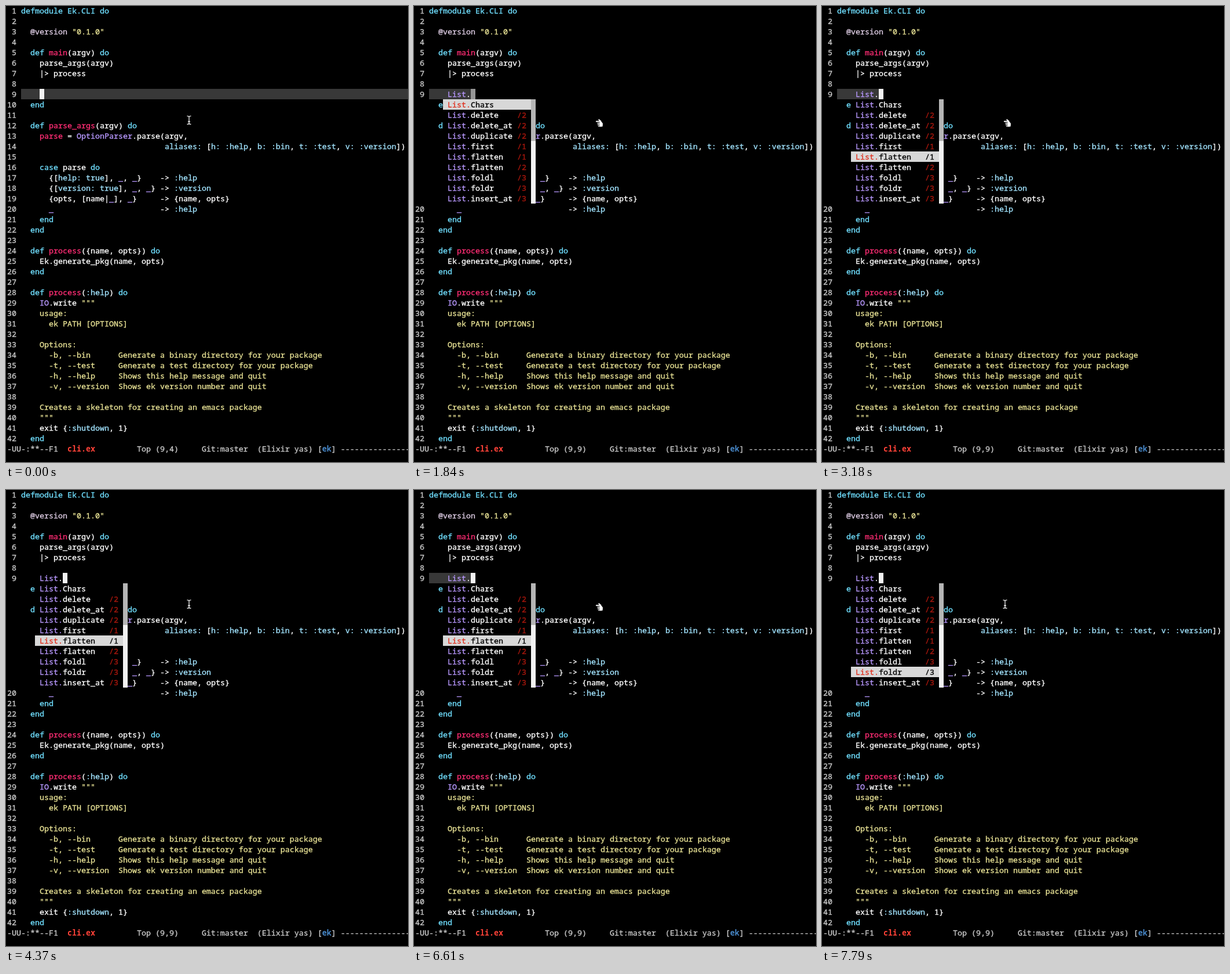
Recreate the animation shown at these times as an HTML page. Size 694 px wide and 787 px high, loop 8000 ms.

```html
<!DOCTYPE html>
<html lang="en">
<head>
<meta charset="utf-8">
<title>Editor completion</title>
<style>
html, body { margin: 0; width: 100%; height: 100%; overflow: hidden; background: #000; }
#stage {
  position: absolute; left: 0; top: 0; width: 694px; height: 787px; overflow: hidden; background: #000;
  color: #fff; font: 500 13.3333px/18px "Noto Sans Mono", monospace; font-variant-ligatures: none;
  -webkit-text-stroke: .35px currentColor;
}
#stage div, #stage svg { position: absolute; }
.line { white-space: pre; height: 18px; }
.line span { -webkit-text-stroke-color: currentColor; }
b { font-weight: 700; -webkit-text-stroke: 0; }
.key { color: #70dfff; }
.func { color: #ff2d74; }
.atom { color: #a2e4ff; }
.mod { color: #b898ff; }
.str { color: #e8e295; }
.attr { color: #dccbe2; }
.num, .mode { color: #cacaca; }
.file { color: #ff4238; }
.proj { color: #4787c8; }
.gold { color: #d2b400; }
.teal { color: #00a9ac; }
.hover { background: #000; color: #f4f4f4; }
.arity { color: #a8170d; }
#hl { left: 26px; top: 143px; height: 18px; background: #383838; }
#cursor { top: 143px; width: 8px; height: 18px; }
#popup { left: 50px; top: 161px; width: 160px; height: 180px; background: #000; }
.item { left: 0; width: 144px; padding-left: 8px; }
.item.on { background: #d8d8d8; color: #000; }
.item.on .mod { color: #e0301f; }
.item.on .arity { color: #000; }
#track { left: 152px; top: 0; width: 8px; height: 180px; background: #f2f2f2; }
#thumb { left: 152px; top: 0; width: 8px; height: 72px; background: #b5b5b5; }
#help { left: 0; top: 305px; width: 694px; height: 482px; background: #000; }
.inactive { background: #383838; width: 692px; overflow: hidden; }
</style>
</head>
<body>
<div id="stage">
  <div id="hl"></div>
  <div id="code"></div>
  <div id="cursor"></div>
  <div id="popup"></div>
  <div id="help"></div>
  <svg id="ibeam" width="694" height="787" fill="none" stroke="#f0f0f0" stroke-width="1.3">
    <path d="M312.5 189.8Q315.5 189.8 316 191.5Q316.5 189.8 319.5 189.8M316 191V203M312.5 204.2Q315.5 204.2 316 202.5Q316.5 204.2 319.5 204.2M314 199.5H318"/>
  </svg>
  <svg id="hand" width="694" height="787" fill="#fff" stroke="#fff" stroke-linecap="round">
    <path d="M320.5 198.5L324 200L326 203L325.5 208L322 208.5L320.5 207Z" stroke="none"/>
    <path d="M314.8 199.3H322M319.2 196.2L322.5 199" stroke-width="1.9"/>
    <path d="M317.3 202.4H322M317.6 205H322M318.8 207.5H322" stroke-width="1.7"/>
  </svg>
</div>
<script>
const source = `defmodule Ek.CLI do

  @version "0.1.0"

  def main(argv) do
    parse_args(argv)
    |> process


  end

  def parse_args(argv) do
    parse = OptionParser.parse(argv,
                               aliases: [h: :help, b: :bin, t: :test, v: :version])

    case parse do
      {[help: true], _, _}    -> :help
      {[version: true], _, _} -> :version
      {opts, [name|_], _}     -> {name, opts}
      _                       -> :help
    end
  end

  def process({name, opts}) do
    Ek.generate_pkg(name, opts)
  end

  def process(:help) do
    IO.write """
    usage:
      ek PATH [OPTIONS]

    Options:
      -b, --bin      Generate a binary directory for your package
      -t, --test     Generate a test directory for your package
      -h, --help     Shows this help message and quit
      -v, --version  Shows ek version number and quit

    Creates a skeleton for creating an emacs package
    """
    exit {:shutdown, 1}
  end`.split("\n");

const items = ["Chars", "delete/2", "delete_at/2", "duplicate/2", "first/1", "flatten/1",
  "flatten/2", "foldl/3", "foldr/3", "insert_at/3"];

const $ = id => document.getElementById(id);
const escapeHtml = s => s.replace(/&/g, "&amp;").replace(/</g, "&lt;").replace(/>/g, "&gt;");
const span = (cls, s) => `<span class="${cls}">${escapeHtml(s)}</span>`;
const bold = (cls, s) => `<b class="${cls}">${escapeHtml(s)}</b>`;

const rules = [
  ["str", /"+[^"]*"+/],
  ["func", /(?<=def )\w+|\bparse(?= =)/],
  ["key", /\b(?:defmodule|def|do|end|case)\b|Ek\.CLI/],
  ["attr", /@\w+/],
  ["atom", /:\w+|\w+:|\btrue\b/],
  ["mod", /\b(?:OptionParser|IO|List|_)\b/],
];
const tokens = new RegExp(rules.map(([cls, re]) => `(?<${cls}>${re.source})`).join("|"), "g");

function highlight(text) {
  let html = "", end = 0;
  for (const m of text.matchAll(tokens)) {
    const cls = Object.keys(m.groups).find(k => m.groups[k] !== undefined);
    html += escapeHtml(text.slice(end, m.index)) + span(cls, m[0]);
    end = m.index + m[0].length;
  }
  return html + escapeHtml(text.slice(end));
}

function addLine(parent, col, top, html = "", cls = "") {
  const el = document.createElement("div");
  el.className = "line " + cls;
  el.style.left = 2 + col * 8 + "px";
  el.style.top = top + "px";
  el.innerHTML = html;
  parent.append(el);
  return el;
}

const numbers = [], rows = [];
source.forEach((text, i) => {
  const top = i * 18 - 1;
  numbers.push(addLine($("code"), 0, top, String(i + 1).padStart(2), "num"));
  const inDoc = i > 28 && i < 40;
  rows.push(addLine($("code"), 3, top, inDoc ? span("str", text) : highlight(text)));
});

const modeLine = (column, mode) =>
  `-UU-:**--F1  ${bold("file", "cli.ex")}         Top (9,${column})     Git:master  ` +
  `(${mode} yas) [${bold("proj", "ek")}] ${"-".repeat(16)}`;
const status = addLine($("code"), 0, 755, "", "mode");

const choices = items.map((item, i) => {
  const [name, arity] = item.split("/");
  const html = span("mod", "List.") + name.padEnd(10) + (arity ? span("arity", "/" + arity) : "");
  const el = addLine($("popup"), 0, i * 18, html, "item");
  el.style.left = 0;
  return el;
});
$("popup").insertAdjacentHTML("beforeend", '<div id="track"></div><div id="thumb"></div>');

const help = $("help");
addLine(help, 0, 0, modeLine(9, span("hover", "Elixir")), "mode inactive");
addLine(help, 31, 36, bold("gold", "def flatten(list)"));
addLine(help, 0, 72, `Flattens the given ${span("teal", "list")} of nested lists.`);
addLine(help, 0, 108, span("gold", "Examples"));
addLine(help, 2, 144, bold("teal", "iex> List.flatten([1, [[2], 3]])"));
addLine(help, 2, 162, bold("teal", "[1,2,3]"));
addLine(help, 0, 450, `-UUU:%*--F1  ${bold("file", "*elixir help*")}   All (1,0)      ` +
  `(Fundamental) [${bold("proj", "ek")}] ${"-".repeat(24)}`, "mode");
const addBlock = (x, y, w, h, color) => help.insertAdjacentHTML("beforeend",
  `<div style="left:${x}px;top:${y}px;width:${w}px;height:${h}px;background:${color}"></div>`);
addBlock(2, 18, 8, 18, "#f2f2f2");
addBlock(4, 145, 4, 17, "#00a9ac");
addBlock(4, 163, 4, 17, "#00a9ac");

// Each step changes part of the state; choice -1 means no popup.
const steps = [
  [0, { typed: "", choice: -1, hand: false, hl: true, help: false, dim: false }],
  [500, { typed: "L" }],
  [800, { typed: "Li" }],
  [940, { typed: "Lis" }],
  [1540, { hand: true }],
  [1840, { typed: "List.", choice: 0, dim: true }],
  [2440, { choice: 1, dim: false }],
  [2590, { choice: 2 }],
  [2730, { choice: 3 }],
  [2880, { choice: 4 }],
  [3180, { choice: 5 }],
  [3780, { hand: false }],
  [4370, { hl: false }],
  [4970, { help: true }],
  [5860, { hand: true }],
  [6610, { help: false, hl: true }],
  [6760, { choice: 6 }],
  [6900, { choice: 7 }],
  [7200, { choice: 8 }],
  [7350, { hand: false }],
  [7790, { hl: false }],
];
const show = (el, on) => { el.style.visibility = on ? "visible" : "hidden"; };

function render(state) {
  const { typed, choice } = state, open = choice >= 0;
  const cursorX = 58 + typed.length * 8;
  rows[8].innerHTML = "    " + highlight(typed);
  status.innerHTML = modeLine(4 + typed.length, "Elixir");
  $("hl").style.width = (open ? cursorX : 694) - 26 + "px";
  $("cursor").style.left = cursorX + "px";
  $("cursor").style.background = state.dim ? "#959595" : "#f2f2f2";
  show($("hl"), state.hl && !state.help);
  show($("cursor"), !state.help);
  show($("popup"), open);
  show(help, state.help);
  show($("hand"), state.hand);
  show($("ibeam"), !state.hand);
  numbers.forEach((el, i) => show(el, !(open && i > 8 && i < 19)));
  choices.forEach((el, i) => el.classList.toggle("on", i === choice));
}

const start = performance.now();
let current = -1;
function tick() {
  const time = (performance.now() - start) % 8000;
  const index = steps.filter(([at]) => at <= time).length - 1;
  if (index !== current) {
    current = index;
    render(Object.assign({}, ...steps.slice(0, index + 1).map(([, change]) => change)));
  }
  requestAnimationFrame(tick);
}
tick();
</script>
</body>
</html>
```
